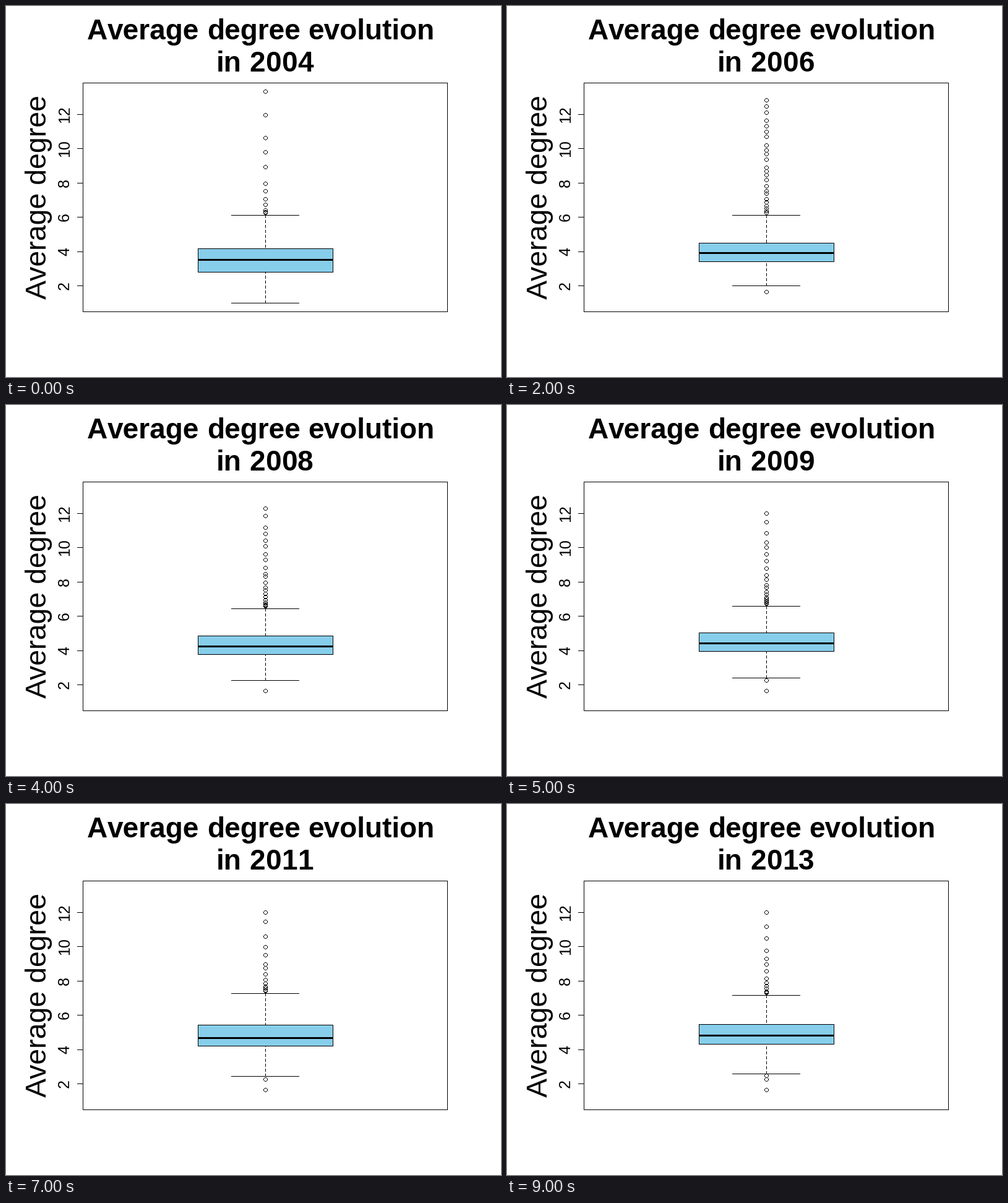
These frames come from a looping animation (800x600 px, 10 s). A matplotlib script:

```python
import numpy as np
import matplotlib.pyplot as plt
from matplotlib.animation import FuncAnimation

W, H, DPI = 800, 600, 100
PX = 72 / DPI                     # one pixel in points
plt.rcParams["font.family"] = "Liberation Sans"
plt.rcParams["path.simplify"] = False

CX = 419
BOX_L, BOX_R = 310, 528
CAP_L, CAP_R = 364, 473
FIRST_YEAR, YEARS = 2004, 10

# Each quantity glides through its values at a few key years
KEYS = [0, 1, 2, 5, 7, 9]
CURVES = {
    "top": [338, 342, 338, 325, 306, 309],
    "q3": [392, 391, 383, 368, 357, 356],
    "mid": [410, 408, 399, 385, 378, 374],
    "q1": [430, 425, 413, 398, 391, 388],
    "low": [480, 471, 452, 441, 440, 436],
    "peak": [138, 138, 152, 175, 175, 175],
    "count": [12, 15, 24, 21, 15, 15],
    "crowding": [2.2, 1.8, 1.35, 2.2, 2.3, 2.5],
}
STRAYS = np.array([439, 445, 462, 480])


def curve(name, i):
    return np.interp(i, KEYS, CURVES[name])


def row(name, i):
    return int(round(curve(name, i)))


def outliers(i, top, low):
    """Rows that crowd near the upper whisker and thin out to the peak."""
    rng = np.random.default_rng(FIRST_YEAR + i)
    n = row("count", i)
    u = np.linspace(0, 1, n)
    u[1:-1] += rng.uniform(-0.3, 0.3, n - 2) / n
    base = top - 4
    upper = base - (base - row("peak", i)) * u ** curve("crowding", i)
    lower = STRAYS[(STRAYS > low + 2) & (STRAYS <= low + 26)]
    return np.round(np.concatenate([upper, lower]))


fig = plt.figure(figsize=(W / DPI, H / DPI), dpi=DPI, facecolor="white")
ax = fig.add_axes([0, 0, 1, 1])
ax.set_xlim(0, W)
ax.set_ylim(H, 0)
ax.axis("off")


def line(xs=(), ys=(), width=1, cap="projecting", z=2, **kw):
    """Crisp line through pixel centres."""
    art, = ax.plot(np.add(xs, 0.5), np.add(ys, 0.5), color="black",
                   lw=width * PX, antialiased=False, snap=False, zorder=z,
                   solid_capstyle=cap, solid_joinstyle="miter",
                   dash_capstyle="butt", **kw)
    return art


def move(art, xs, ys):
    art.set_data(np.add(xs, 0.5), np.add(ys, 0.5))


def label(x, y, text, size, **kw):
    return ax.text(x, y, text, fontsize=size * PX, color="black", ha="left",
                   va="baseline", rotation_mode="anchor", **kw)


# Static parts: frame, ticks and text
line([124, 713, 713, 124, 124], [124, 124, 494, 494, 124])
for value in range(2, 13, 2):
    y = round(507.7 - 27.72 * value)
    text = str(value)
    line([115, 124], [y, y])
    label(102, y + 7 * len(text), text, 25, rotation=90)

for x, part in ((131, "A"), (164, "verage"), (325, "degree"),
                (488.5, "evolution")):
    label(x, 54, part, 46, weight="bold")
label(340, 106, "in", 46, weight="bold")
digits = [label(393 + 26 * k, 106, "", 46, weight="bold") for k in range(4)]

label(65, 474.5, "A", 46.5, rotation=90)
label(65, 443.5, "verage degree", 46.5, rotation=90)

# Moving parts
fill, = ax.fill([0, 0, 1, 1], [0, 1, 1, 0], color="skyblue", lw=0,
                antialiased=False, snap=False, zorder=1)
median = line(width=3, cap="butt", z=3)
border = line(z=4)
whiskers = [line(linestyle=(0, (5, 3))) for _ in range(2)]
staples = [line() for _ in range(2)]
dots = line(cap="butt", z=5)


def ring():
    """Seven-pixel ring made of straight strokes, so corners stay thin."""
    strokes = []
    for s in (-1, 1):
        strokes.append([(-1.5, 3 * s), (1.5, 3 * s)])
        strokes.append([(3 * s, -1.5), (3 * s, 1.5)])
        strokes += [[(1.5 * s, 2 * v), (2.5 * s, 2 * v)] for v in (-1, 1)]
    gap = (np.nan, np.nan)
    return np.array([p for a, b in strokes for p in (a, b, gap)]).T


RING_X, RING_Y = ring()


def draw(i):
    top, q3, mid, q1, low = (row(k, i)
                             for k in ("top", "q3", "mid", "q1", "low"))
    for d, ch in zip(digits, str(FIRST_YEAR + i)):
        d.set_text(ch)

    corners_x = [BOX_L, BOX_R, BOX_R, BOX_L, BOX_L]
    corners_y = [q3, q3, q1, q1, q3]
    fill.set_xy(np.column_stack([corners_x, corners_y]) + 0.5)
    move(border, corners_x, corners_y)
    move(median, [BOX_L, BOX_R + 0.5], [mid, mid])

    for whisker, staple, end, edge in zip(whiskers, staples, (top, low),
                                          (q3, q1)):
        move(whisker, [CX, CX], [end, edge])
        move(staple, [CAP_L, CAP_R], [end, end])

    rows = outliers(i, top, low)
    move(dots, np.tile(CX + RING_X, len(rows)),
         (rows[:, None] + RING_Y).ravel())
    return [fill, border, median, dots, *whiskers, *staples, *digits]


anim = FuncAnimation(fig, draw, frames=YEARS, interval=1000,
                     init_func=lambda: draw(0), repeat=True, repeat_delay=0)
plt.show()
```
